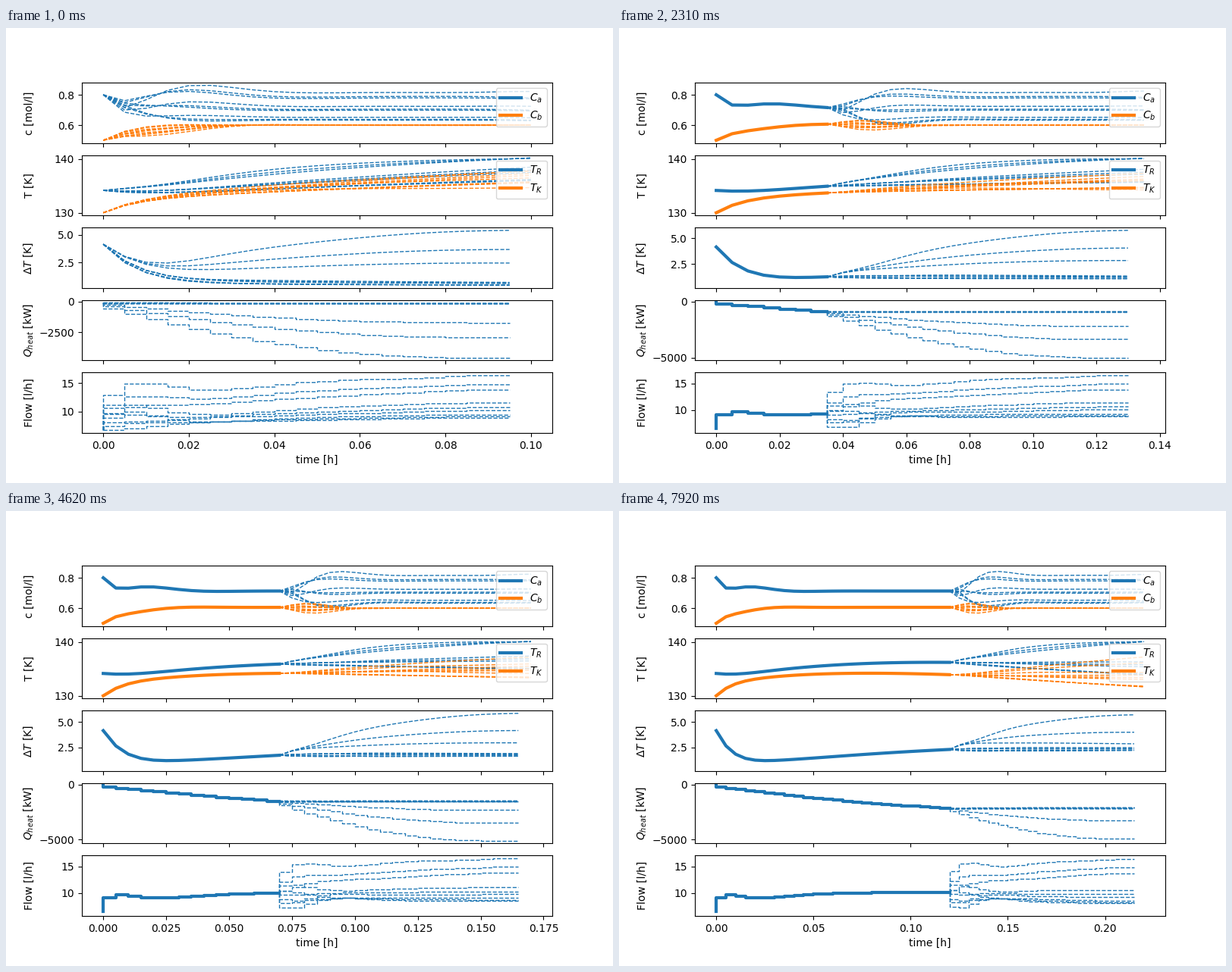
Recreate the animation shown at these times as a matplotlib script. Size 800 by 600 pixels, loop 8000 ms.

```python
"""Robust predictive control of a stirred tank reactor: history and scenario forecasts."""
import itertools

import matplotlib.pyplot as plt
import numpy as np
from matplotlib.animation import FuncAnimation

LOOP, TICK, HOLD = 8000, 40, 330      # ms
STATES = 25
DT, N = 0.005, 20                     # control step [h], horizon

# Reactor constants
K_AB, K_AD = 1.287e12, 9.043e9
E_AB, E_AD = 9758.3, 8560.0
H_AB, H_BC, H_AD = 4.2, -11.0, -41.85
RHO_CP, VOLUME, JACKET_CP = 0.9342 * 3.01, 10.01, 10.0
WALL = 4032 * 0.215
T_IN, C_IN = 130.0, 5.1

# Controller: Cb should be 0.6, moves of flow and heat cost a little
CB_SET, T_MAX = 0.6, 140.0
MOVE = np.sqrt([9e-5, 2.25e-9])[:, None, None]
HOT = np.sqrt(0.05)
SCALE = np.array([10.0, 1000.0])
PAIRS = np.array(list(itertools.product([1, 1.05, 0.95], [1, 1.1, 0.9])))
ALPHA, BETA = PAIRS[:, :1], PAIRS[:, 1:]
EPS = 1e-4
PROBE = EPS * np.vstack([np.zeros(2 * N), np.eye(2 * N)])


def rates(x, u, alpha, beta):
    ca, cb, tr, tk = x
    flow, heat = u
    kelvin = tr + 273.15
    k2 = K_AB * np.exp(-E_AB / kelvin)
    r1 = beta * k2 * ca
    r2 = k2 * cb
    r3 = K_AD * np.exp(-alpha * E_AD / kelvin) * ca * ca
    wall = WALL * (tr - tk)
    return np.array([
        flow * (C_IN - ca) - r1 - r3,
        -flow * cb + r1 - r2,
        -(H_AB * r1 + H_BC * r2 + H_AD * r3) / RHO_CP
        + flow * (T_IN - tr) - wall / (RHO_CP * VOLUME),
        (heat + wall) / JACKET_CP,
    ])


def advance(x, u, alpha=1.0, beta=1.0):
    a = rates(x, u, alpha, beta)
    b = rates(x + DT / 2 * a, u, alpha, beta)
    c = rates(x + DT / 2 * b, u, alpha, beta)
    d = rates(x + DT * c, u, alpha, beta)
    return x + DT / 6 * (a + 2 * b + 2 * c + d)


def rollout(x0, u):
    """Forecast all scenarios; u has shape (N, 2, scenarios, variants)."""
    xs = [np.zeros((4,) + u.shape[2:]) + x0[:, None, None]]
    for uk in u:
        xs.append(advance(xs[-1], uk, ALPHA, BETA))
    return np.array(xs)


def inputs(z):
    """Scaled plans (scenarios, variants, 2N) to inputs (N, 2, scenarios, variants)."""
    u = z.reshape(z.shape[:2] + (N, 2)) * SCALE
    return np.moveaxis(u, (2, 3), (0, 1))


def linearize(z, x0, u_prev):
    u = inputs(z[:, None, :] + PROBE)
    xs = rollout(x0, u)
    first = np.zeros((1,) + u.shape[1:]) + u_prev[:, None, None]
    moves = np.diff(u, axis=0, prepend=first) * MOVE
    res = np.concatenate([
        xs[1:, 1] - CB_SET,
        HOT * np.maximum(xs[1:-1, 2] - T_MAX, 0),
        moves.reshape((2 * N,) + u.shape[2:]),
    ])
    res = np.moveaxis(res, 0, 1)
    r = res[:, :, 0]
    return r, (res[:, :, 1:] - res[:, :, :1]) / EPS


def newton_step(r, jac, damping):
    """Damped step where all scenarios share their first input pair."""
    jt = jac.transpose(0, 2, 1)
    h = jt @ jac + damping * np.eye(2 * N)
    g = jt @ r[:, :, None]
    a, b, c = h[:, :2, :2], h[:, :2, 2:], h[:, 2:, 2:]
    sol = np.linalg.solve(c, np.concatenate([h[:, 2:, :2], g[:, 2:]], axis=2))
    coupled = b @ sol
    left = (a - coupled[:, :, :2]).sum(axis=0)
    right = (g[:, :2, 0] - coupled[:, :, 2]).sum(axis=0)
    shared = -np.linalg.solve(left, right)
    own = -sol[:, :, 2] - sol[:, :, :2] @ shared
    return np.hstack([np.tile(shared, (len(own), 1)), own])


def optimize(z, x0, u_prev, rounds, damping):
    r, jac = linearize(z, x0, u_prev)
    cost = (r * r).sum()
    for _ in range(rounds):
        step = newton_step(r, jac, damping)
        r_new, jac_new = linearize(z + step, x0, u_prev)
        cost_new = (r_new * r_new).sum()
        if cost_new < cost:
            z, r, jac, cost = z + step, r_new, jac_new, cost_new
            damping = max(damping / 10, 1e-10)
        else:
            damping *= 10
        if np.abs(step).max() < 2e-4:
            break
    return z


def curves(xs, us):
    """Ca, Cb, TR, TK, temperature difference, heat, flow."""
    diff = (xs[:, 2] - xs[:, 3])[:len(us)]
    return [xs[:, 0], xs[:, 1], xs[:, 2], xs[:, 3], diff, us[:, 1], us[:, 0]]


PANEL = [0, 0, 1, 1, 2, 3, 4]


def simulate():
    x, u = np.array([0.8, 0.5, 134.14, 130.0]), np.zeros(2)
    z = np.tile([0.9, -0.5], (len(PAIRS), N))
    low, high = np.full(5, np.inf), np.full(5, -np.inf)
    xs, us, out = [], [], []
    for k in range(STATES):
        rounds, damping = (10, 1e-7) if k else (40, 1e-3)
        z = optimize(z, x, u, rounds, damping)
        plan = inputs(z[:, None, :])
        u = plan[0, :, 0, 0]
        xs.append(x)
        us.append(u)
        past = curves(np.array(xs), np.array(us))
        ahead = curves(rollout(x, plan)[..., 0], plan[..., 0])
        for p, old, new in zip(PANEL, past, ahead):
            low[p] = min(low[p], old.min(), new.min())
            high[p] = max(high[p], old.max(), new.max())
        out.append((past, ahead, low.copy(), high.copy()))
        x = advance(x, u)
    return out


history = simulate()

fig, axes = plt.subplots(5, sharex=True, figsize=(8, 6), dpi=100)
labels = ["c [mol/l]", "T [K]", r"$\Delta T$ [K]", "$Q_{heat}$ [kW]", "Flow [l/h]"]
for ax, label in zip(axes, labels):
    ax.set_ylabel(label)
axes[-1].set_xlabel("time [h]")
fig.align_ylabels()

thick, thin = [], []
for i, p in enumerate(PANEL):
    style = dict(color="C1" if i in (1, 3) else "C0",
                 drawstyle="steps" if i > 4 else "default")
    thick += axes[p].plot([], [], lw=3, **style)
    thin.append([axes[p].plot([], [], "--", lw=1, **style)[0] for _ in PAIRS])
axes[0].legend(thick[:2], ["$C_a$", "$C_b$"], loc="upper right")
axes[1].legend(thick[2:4], ["$T_R$", "$T_K$"], loc="upper right")


def update(i):
    k = min((TICK * i + 30) // HOLD, STATES - 1)
    past, ahead, low, high = history[k]
    now = k * DT
    for line, dashes, old, new in zip(thick, thin, past, ahead):
        line.set_data(DT * np.arange(len(old)), old)
        times = now + DT * np.arange(len(new))
        for dash, values in zip(dashes, new.T):
            dash.set_data(times, values)
    end = now + N * DT
    axes[0].set_xlim(-0.05 * end, 1.05 * end)
    for ax, lo, hi in zip(axes, low, high):
        pad = 0.05 * (hi - lo)
        ax.set_ylim(lo - pad, hi + pad)
    return []


anim = FuncAnimation(fig, update, frames=LOOP // TICK, interval=TICK,
                     repeat=True, cache_frame_data=False)
plt.show()
```
